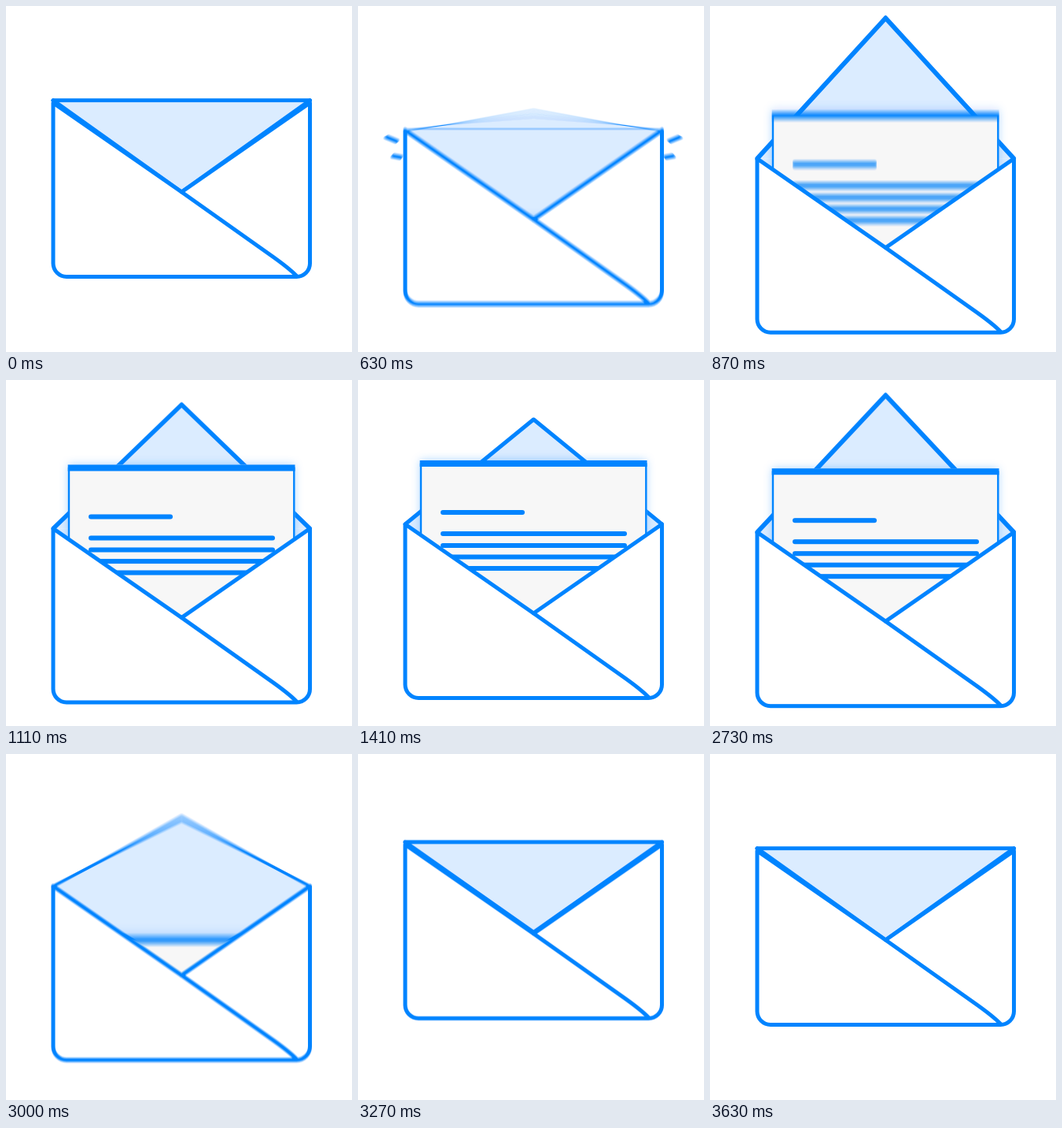
These frames come from a looping animation (440x439 px, 4140 ms). An HTML page with a canvas:

```html
<!DOCTYPE html>
<html lang="en">
<head>
<meta charset="utf-8">
<title>Envelope</title>
<style>
html, body { margin: 0; width: 100%; height: 100%; overflow: hidden; background: #fff; }
canvas { display: block; }
</style>
</head>
<body>
<canvas id="stage" width="440" height="439"></canvas>
<script>
const LOOP = 4140, STEP = 30, SHUTTER = 16, SAMPLES = 16;
const BLUE = '#0084ff', PALE = '#dbecff';
const LEFT = 60, RIGHT = 386.5, MID = 223.3, HINGE = 123, BOTTOM = 343.5;

const out = document.getElementById('stage').getContext('2d');
const layer = document.createElement('canvas');
layer.width = 440;
layer.height = 439;
const c = layer.getContext('2d');

// Keys are [time, value] pairs, eased in and out between neighbours.
function track(t, keys) {
  const i = keys.findIndex(k => k[0] > t);
  if (i === 0) return keys[0][1];
  if (i < 0) return keys[keys.length - 1][1];
  const [t0, a] = keys[i - 1], [t1, b] = keys[i];
  const u = (t - t0) / (t1 - t0);
  return a + (b - a) * u * u * (3 - 2 * u);
}

const bodyY = [[0, 0], [420, -11], [810, 71], [1410, 60], [2370, 60], [2800, 71], [3330, -11], [3630, 0]];
const flapY = [[450, 113], [830, -179], [1410, -133], [2370, -133], [2825, -179], [3290, 113]];
const letterY = [[585, 246], [945, 46], [2800, 46], [3105, 246]];

function line(points, width, color = BLUE) {
  c.beginPath();
  points.forEach(p => c.lineTo(...p));
  c.lineWidth = width;
  c.strokeStyle = color;
  c.stroke();
}

function fill(points, color) {
  c.beginPath();
  points.forEach(p => c.lineTo(...p));
  c.fillStyle = color;
  c.fill();
}

function flap(h) {
  const open = h < 0, size = open ? 133 : 113, base = open ? 0 : -3.2;
  const tri = [[LEFT, base], [MID, size], [RIGHT, base]];
  c.save();
  c.translate(0, HINGE);
  c.scale(1, h / size);
  if (open) fill(tri, PALE);
  line(tri, 5);
  c.restore();
  if (h > -18) {
    const s = Math.max(h / 113, 0), y = HINGE - 3.2 * s;
    line([[LEFT, y], [RIGHT, y]], 2.5 + 2.5 * s);
  }
}

function letter(y) {
  c.save();
  c.beginPath();
  c.rect(0, -200, 440, 460);
  c.clip();
  c.shadowColor = 'rgba(0,132,255,.35)';
  c.shadowBlur = 11;
  c.fillStyle = '#f7f7f7';
  c.fillRect(79, y - 4, 288.3, 300);
  c.shadowColor = 'transparent';
  for (const x of [80, 366.3]) line([[x, y], [x, y + 300]], 2.4);
  c.fillStyle = BLUE;
  c.fillRect(78.7, y - 4, 288.8, 8);
  line([[108, y + 62], [209, y + 62]], 6);
  for (const dy of [89, 104, 118.5, 133]) line([[108, y + dy], [339, y + dy]], 6);
  c.restore();
}

function sparks(t) {
  const u = (t - 570) / 170;
  if (u <= 0 || u >= 1) return;
  for (const [x, y, dx, dy] of [[57, 140, -54, -22], [60, 158.3, -40, -7.3]]) {
    const ends = [u ** 1.8, Math.min(1, u * 1.05)].map(k => [x + dx * k, y + dy * k]);
    line(ends, 5.2);
    line(ends.map(p => [445.5 - p[0], p[1]]), 5.2);
  }
}

function front() {
  c.beginPath();
  c.moveTo(LEFT, HINGE);
  c.lineTo(MID, 236);
  c.lineTo(RIGHT, HINGE);
  c.lineTo(RIGHT, BOTTOM - 17);
  c.arcTo(RIGHT, BOTTOM, RIGHT - 17, BOTTOM, 17);
  c.lineTo(LEFT + 17, BOTTOM);
  c.arcTo(LEFT, BOTTOM, LEFT, BOTTOM - 17, 17);
  c.closePath();
  c.fillStyle = '#fff';
  c.fill();
  c.lineWidth = 5;
  c.strokeStyle = BLUE;
  c.stroke();
  c.beginPath();
  c.moveTo(MID, 236);
  c.lineTo(335, 315);
  c.quadraticCurveTo(360, 332.5, 369.5, 342.5);
  c.stroke();
}

function scene(t) {
  c.setTransform(1, 0, 0, 1, 0, 0);
  c.fillStyle = '#fff';
  c.fillRect(0, 0, 440, 439);
  c.lineCap = c.lineJoin = 'round';
  c.translate(0, track(t, bodyY));
  fill([[LEFT, HINGE], [MID, 236], [RIGHT, HINGE]], PALE);
  flap(track(t, flapY));
  letter(track(t, letterY));
  sparks(t);
  front();
}

const isStill = t => t < 30 || (t >= 1410 && t < 2400) || t >= 3630;

// Averaging several moments inside the shutter gives the motion blur.
function draw(t) {
  const n = isStill(t) ? 1 : SAMPLES;
  for (let i = 0; i < n; i++) {
    scene(t + ((i + 0.5) / n - 0.5) * SHUTTER);
    out.globalAlpha = 1 / (i + 1);
    out.drawImage(layer, 0, 0);
  }
}

const start = performance.now();
let shown = -1;
function tick() {
  const t = Math.floor((performance.now() - start) % LOOP / STEP) * STEP;
  if (t !== shown) draw(shown = t);
  requestAnimationFrame(tick);
}
tick();
</script>
</body>
</html>
```
